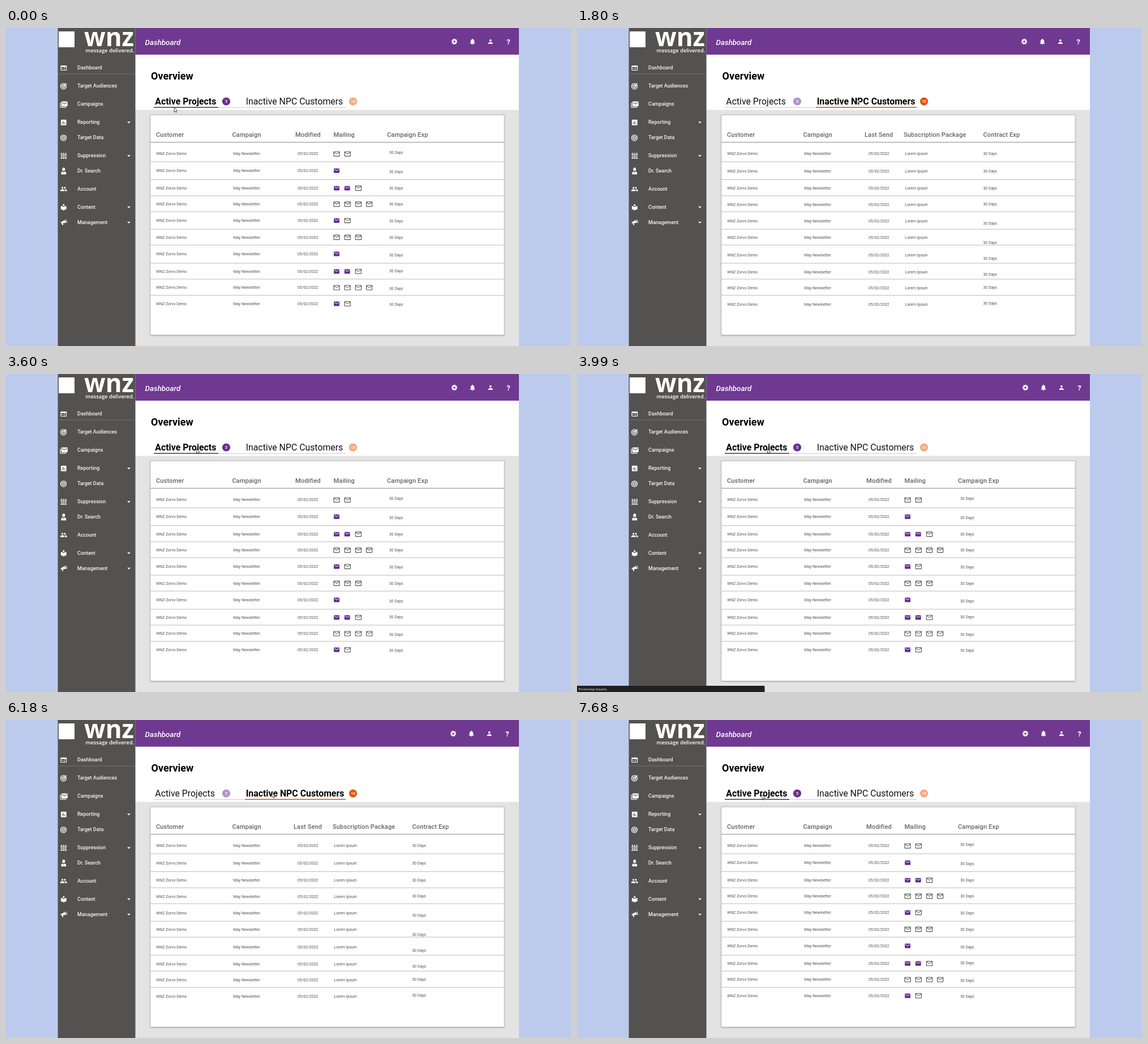
Write an HTML page that moves like this. It is 998 px wide and 561 px high and loops after 7.74 s.

```html
<!DOCTYPE html>
<html lang="en">
<head>
<meta charset="utf-8">
<title>Dashboard</title>
<style>
  html, body { margin: 0; width: 100%; height: 100%; overflow: hidden; background: #bccbed; }
  svg { display: block; width: 100vw; height: 100vh; }
  text { font-family: Roboto, sans-serif; white-space: pre; }
  .nav { font-size: 9px; font-weight: 500; fill: #f4f4f4; }
  .title { font-size: 13.35px; font-weight: 500; font-style: italic; fill: #fff; }
  .h1 { font-size: 18px; font-weight: 700; fill: #000; }
  .on, .off { font-size: 15.85px; fill: #111; }
  .on { font-weight: 700; fill: #000; }
  .head { font-size: 11px; font-weight: 500; fill: #636363; letter-spacing: .15px; }
  .cell { font-size: 6.85px; fill: #505050; }
  .badge { font-size: 7px; font-weight: 500; fill: #fff; text-anchor: middle; }
  .brand { font: 700 44px "Open Sans", sans-serif; fill: #fff; }
  .tag { font: 600 9.3px "Open Sans", sans-serif; fill: #fff; }
  .status { font: 5.6px "Open Sans", sans-serif; fill: #f2f2f2; }
</style>
</head>
<body>
<svg id="stage" viewBox="0 0 998 561" preserveAspectRatio="none">
  <defs>
    <filter id="shadow" x="-5%" y="-5%" width="110%" height="110%">
      <feDropShadow dx="0" dy=".7" stdDeviation="1.3" flood-color="#000" flood-opacity=".35"/>
    </filter>
  </defs>
</svg>
<script>
const LOOP = 7740, STEP = 30;
const PURPLE = '#703991', GREY = '#545251';
const stage = document.getElementById('stage');

function add(parent, tag, attrs, text) {
  const el = document.createElementNS('http://www.w3.org/2000/svg', tag);
  for (const k in attrs) el.setAttribute(k, attrs[k]);
  if (text) el.textContent = text;
  parent.appendChild(el);
  return el;
}
const rect = (p, x, y, width, height, fill, more) => add(p, 'rect', { x, y, width, height, fill, ...more });
const label = (p, cls, x, y, text, more) => add(p, 'text', { class: cls, x, y, ...more }, text);
const dot = (p, cx, cy, r, fill, more) => add(p, 'circle', { cx, cy, r, fill, ...more });
const group = p => add(p, 'g');

// Icons live in a 24 x 24 box
const LETTER = 'M20 4H4c-1.1 0-2 .9-2 2v12c0 1.1.9 2 2 2h16c1.1 0 2-.9 2-2V6c0-1.1-.9-2-2-2z';
const PATHS = {
  mail: LETTER + 'm0 4l-8 5-8-5V6l8 5 8-5v2z',
  outline: LETTER + 'm0 14H4V8l8 5 8-5v10zm-8-7L4 6h16l-8 5z',
  web: LETTER + 'm-5 14H4v-4h11v4zm0-5H4V9h11v4zm5 5h-4V9h4v9z',
  bell: 'M12 22c1.1 0 2-.9 2-2h-4c0 1.1.9 2 2 2zm6-6v-5c0-3.1-1.6-5.6-4.5-6.3V4a1.5 1.5 0 0 0-3 0v.7C7.6 5.4 6 7.9 6 11v5l-2 2v1h16v-1z',
  person: 'M12 12a4 4 0 1 0 0-8 4 4 0 0 0 0 8zm0 2c-2.7 0-8 1.3-8 4v2h16v-2c0-2.7-5.3-4-8-4z',
  chart: 'M19 3H5c-1.1 0-2 .9-2 2v14c0 1.1.9 2 2 2h14c1.1 0 2-.9 2-2V5c0-1.1-.9-2-2-2zM9 17H7v-7h2zm4 0h-2V7h2zm4 0h-2v-4h2z',
  people: 'M16 11a3 3 0 1 0 0-6 3 3 0 0 0 0 6zm-8 0a3 3 0 1 0 0-6 3 3 0 0 0 0 6zm0 2c-2.3 0-7 1.2-7 3.5V19h14v-2.5C15 14.2 10.3 13 8 13zm8 0l-1 .1c1.2.8 2 1.9 2 3.4V19h6v-2.5c0-2.3-4.7-3.5-7-3.5z',
  book: 'M12 11.5C9.6 9.3 6.5 8 3 8v11c3.5 0 6.6 1.3 9 3.5 2.4-2.2 5.5-3.5 9-3.5V8c-3.5 0-6.6 1.3-9 3.5zM12 8a3 3 0 1 0 0-6 3 3 0 0 0 0 6z',
  stack: 'M22 3H7C5.9 3 5 3.9 5 5v11c0 1.1.9 2 2 2h15c1.1 0 2-.9 2-2V5c0-1.1-.9-2-2-2zm0 4l-7.5 5L7 7V5l7.5 5L22 5zM3 7H1v13c0 1.1.9 2 2 2h17v-2H3z',
  doctor: 'M12 1a4.500 4.500 0 0 0-4.500 4.500V8a4.500 4.500 0 0 0 9 0V5.500A4.500 4.500 0 0 0 12 1zM9 14c-3 .6-5 2-5 4.500V23h16v-4.500c0-2.500-2-3.900-5-4.500l-3 3z',
  horn: 'M2 11L16 4l4 9-10 1 1 6H7l-1-6H3zM18 3l2-1 4 10-2 1z',
  crowd: 'M2 11h20v2H2zM5 13h2v3H5zM11 13h2v3h-2zM17 13h2v3h-2zM2 17h6v4H2zM9 17h6v4H9zM16 17h6v4h-6zM2 6h6v3H2zM9 6h6v3H9zM16 6h6v3h-6zM3.5 2h3v3h-3zM10.5 2h3v3h-3zM17.5 2h3v3h-3z',
  caret: 'M7 10l5 5 5-5z'
};
function icon(p, name, cx, cy, size, fill = '#fff') {
  const s = size / 24;
  add(p, 'path', { d: PATHS[name], fill, transform: `translate(${cx - size / 2} ${cy - size / 2}) scale(${s})` });
}
const ring = (p, cx, cy, r, width, more) =>
  dot(p, cx, cy, r, 'none', { stroke: '#fff', 'stroke-width': width, ...more });
function gear(p, cx, cy) {
  ring(p, cx, cy, 3, 2.3);
  ring(p, cx, cy, 4.5, 1.5, { pathLength: 16, 'stroke-dasharray': '1 1' });
}

// Fixed frame
rect(stage, 0, 0, 998, 561, '#bccbed');
rect(stage, 228.5, 0, 677.5, 561, '#e3e3e3');
rect(stage, 228.5, 47, 677.5, 97.5, '#fff');
rect(stage, 228.5, 0, 677.5, 47, PURPLE);
rect(stage, 91.5, 0, 137, 561, GREY);
rect(stage, 91.5, 80.7, 137, 1, '#73706e');
rect(stage, 255, 153.5, 625, 388, '#fff', { stroke: '#bdbdbd', 'stroke-width': .8, filter: 'url(#shadow)' });
[236, 267.5, 296, 324, 355, 383, 415, 443, 471.5].forEach(y => rect(stage, 255, y - .5, 625, 1, '#bcbcbc'));
rect(stage, 255, 200.9, 625, 1.3, '#a2a2a2');
rect(stage, 93, 6, 28, 28, '#fff');
label(stage, 'brand', 138, 32, 'wnz');
label(stage, 'tag', 140.5, 43, 'message delivered.');
label(stage, 'title', 245.5, 29.5, 'Dashboard');

// [text, y, icon, has submenu]
const NAV = [
  ['Dashboard', 70, 'web'], ['Target Audiences', 102, 'aim'], ['Campaigns', 134, 'stack'],
  ['Reporting', 166, 'chart', 1], ['Target Data', 193, 'target'], ['Suppression', 225, 'crowd', 1],
  ['Dr. Search', 251.5, 'doctor'], ['Account', 283.3, 'people'], ['Content', 315.5, 'book', 1],
  ['Management', 342.5, 'horn', 1]
];
for (const [text, y, name, sub] of NAV) {
  label(stage, 'nav', 126, y + 3.2, text);
  if (name === 'aim' || name === 'target') {
    ring(stage, 101.5, y + .8, 5, 1.3);
    ring(stage, 101.5, y + .8, 2.5, 1.2);
    dot(stage, 101.5, y + .8, .9, '#fff');
    if (name === 'aim') add(stage, 'path', { d: `M101.5 ${y + .8}l5-5`, stroke: '#fff', 'stroke-width': 1.4 });
  } else icon(stage, name, 101.8, y + .7, name === 'stack' ? 14 : 13);
  if (sub) icon(stage, 'caret', 217, y + .5, 14);
}

// Two tab pages
const TEXT_Y = [222, 251.5, 282.4, 310.7, 339.5, 369.2, 398.3, 429.3, 457.8, 486.3];
const PAGES = [
  {
    tools: 792, left: 256, heads: [[511, 'Modified'], [578.5, 'Mailing'], [673, 'Campaign Exp']],
    shift: [0, 0, 0, 0, 0, 0, 0, 0, 0, 0], expX: 677,
    exp: [220, 253.5, 282.4, 310.5, 340.2, 370, 400.5, 429, 459.5, 488],
    mail: 'oo f ffo oooo fo ooo f ffo oooo fo'.split(' ')
  },
  {
    tools: 790, left: 256.5, heads: [[508, 'Last Send'], [577, 'Subscription Package'], [717.5, 'Contract Exp']],
    shift: [0, 1, .5, .5, .7, .5, 2.3, .8, 1.2, .9], expX: 717.5,
    exp: [222, 252.5, 282.5, 310.5, 344.5, 378.5, 407, 435, 457.8, 486]
  }
];

function buildTabs(g, second) {
  label(g, second ? 'off' : 'on', 263.3, 134.8, 'Active Projects');
  label(g, second ? 'on' : 'off', 423.7, 134.5, 'Inactive NPC Customers');
  rect(g, 261, 139.8, 339, 1, '#c9c9c9');
  if (second) rect(g, 422, 139.2, 178, 1.7, '#de6630');
  else rect(g, 261, 139.2, 114, 1.7, PURPLE);
  dot(g, 389, 129.5, 7.1, second ? '#b592c6' : '#683091');
  dot(g, 613, 129.5, 7.1, second ? '#e3530f' : '#f3a97d');
  label(g, 'badge', 389, 132, '5');
  label(g, 'badge', 613, 132, '10');
}

function buildPage(page, index) {
  const g = group(stage), x = page.tools;
  label(g, 'h1', page.left, 91.3, 'Overview');
  gear(g, x, 24);
  icon(g, 'bell', x + 32, 24, 13);
  icon(g, 'person', x + 63.8, 24, 12);
  label(g, 'badge', x + 95.5, 28.5, '?', { style: 'font-size:13px;font-weight:700' });
  buildTabs(g, index === 1);
  [[265, 'Customer'], [399.5, 'Campaign'], ...page.heads].forEach(([hx, t]) => label(g, 'head', hx, 191.7, t));
  TEXT_Y.forEach((cy, i) => {
    const y = cy + page.shift[i] + 2.4;
    label(g, 'cell', 265.3, y, 'WNZ Zorvo Demo');
    label(g, 'cell', 401.3, y, 'May Newsletter');
    label(g, 'cell', 515, y, '05/02/2022');
    label(g, 'cell', page.expX, page.exp[i] + 2.4, '30 Days');
    if (!page.mail) return label(g, 'cell', 579.5, y, 'Lorem Ipsum');
    [...page.mail[i]].forEach((kind, n) => {
      const mx = 584 + n * 19.2;
      if (kind === 'f') icon(g, 'mail', mx - n * .5, cy + .2, 11.8, '#5f2c8c');
      else icon(g, 'outline', mx, cy + .2, 13.6, '#555');
    });
  });
  return g;
}
const pages = PAGES.map(buildPage);

const bar = group(stage);
rect(bar, -3, 550, 334.5, 14, '#202023', { rx: 2 });
label(bar, 'status', 2.5, 558, 'Processing request...');

const cursor = group(stage);
const look = { fill: '#fff', stroke: '#222', 'stroke-width': .75, 'stroke-linejoin': 'round' };
const arrow = add(cursor, 'path', { d: 'M0 0V8L1.8 6.4 3.1 9.2 4.3 8.7 3.1 6H5.6z', ...look });
const hand = add(cursor, 'path', {
  d: 'M-.9.7c0-1.2 1.7-1.2 1.7 0V4l3.4.7c.9.2 1.3.7 1.2 1.6L5 9l-.6 2H.2L-2.4 7.2c-.7-1 .4-1.9 1.5-.9z', ...look
});

// Pointer stops: [ms, x, y, sag on the way here]
const STOPS = [
  [0, 297, 140], [390, 297, 140], [1080, 505, 126], [1170, 505, 126], [1350, 500, 124.5],
  [1710, 500, 124.5], [2490, 341, 133], [2880, 336.5, 132], [5700, 336.5, 132], [6060, 470, 128.5],
  [6330, 470, 128.5], [6900, 327, 132, 8], [LOOP, 327, 132]
];
const clamp = v => Math.max(0, Math.min(1, v));
const ease = p => p * p * (3 - 2 * p);

function pointer(t) {
  const i = STOPS.findIndex(s => s[0] > t);
  const [t0, x0, y0] = STOPS[i - 1], [t1, x1, y1, sag = 0] = STOPS[i];
  const p = ease((t - t0) / (t1 - t0));
  return [x0 + (x1 - x0) * p, y0 + (y1 - y0) * p + sag * Math.sin(Math.PI * p)];
}

function draw(now) {
  const t = Math.floor((now % LOOP) / STEP) * STEP;
  const second = (t >= 1530 && t < 3600) || (t >= 6120 && t < 7200);
  pages[0].style.display = second ? 'none' : '';
  pages[1].style.display = second ? '' : 'none';
  bar.style.opacity = Math.min(clamp((t - 3600) / 150), clamp((4290 - t) / 150));
  const [x, y] = pointer(t);
  const link = second ? x < 397 : x > 422;
  hand.style.display = link ? '' : 'none';
  arrow.style.display = link ? 'none' : '';
  cursor.setAttribute('transform', `translate(${x.toFixed(2)} ${y.toFixed(2)})`);
}

const start = performance.now();
function tick() {
  draw(performance.now() - start);
  requestAnimationFrame(tick);
}
tick();
</script>
</body>
</html>
```
